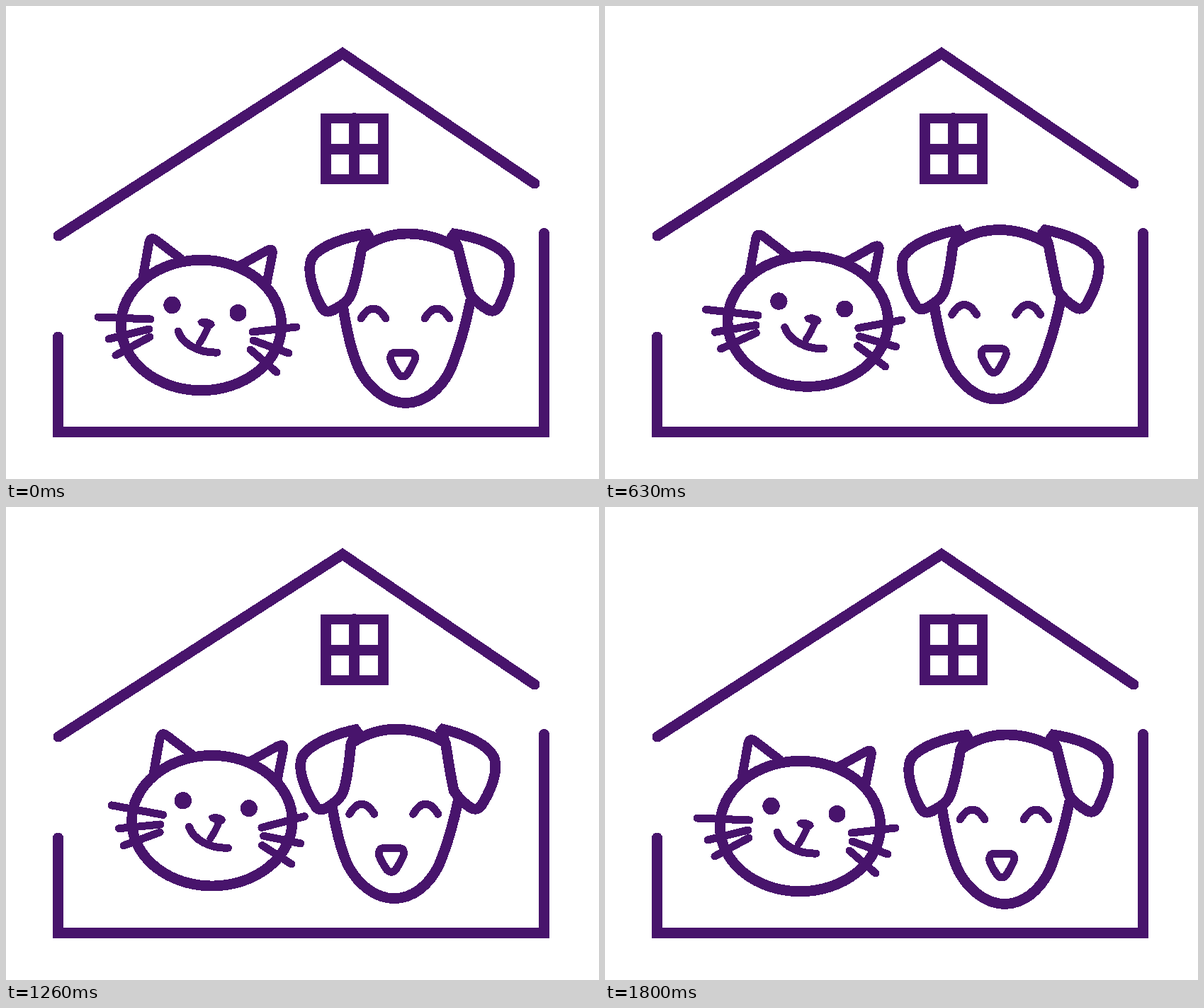
An HTML page for the animation above (2100 ms loop, 837 by 669 pixels).

```html
<!DOCTYPE html>
<html lang="en">
<head>
<meta charset="utf-8">
<title>Cat and dog at home</title>
<style>
  html, body { margin: 0; width: 100%; height: 100%; overflow: hidden; background: #fff; }
  svg { display: block; width: 837px; height: 669px; shape-rendering: crispEdges; }
  .line { fill: none; stroke: #48146c; stroke-width: 14.8; }
  .round { stroke-linecap: round; stroke-linejoin: round; }
  .solid { fill: #48146c; }
  .ear { fill: #fff; stroke-linejoin: bevel; }
  .wall { stroke-width: 15; stroke-linecap: round; }
  .thin { stroke-width: 11; }
</style>
</head>
<body>
<svg viewBox="0 0 837 669">
  <clipPath id="lids"><rect id="gap" x="220" width="30"/></clipPath>

  <path class="line wall" d="M74 325L475 67L746 251"/>
  <path class="line wall" d="M73.5 468V602.5H759.5V321.5"/>
  <path class="solid" fill-rule="evenodd" d="M444 152H540V252H444Z
    M459 166V195H484V166Z M499 166V195H525V166Z
    M459 210V238H484V210Z M499 210V238H525V210Z"/>
  <circle class="solid" cx="491.5" cy="158.5" r="7.5"/>

  <g id="cat">
    <ellipse class="line" cx="275.5" cy="451.5" rx="113.3" ry="92.3"/>
    <g class="line round" style="stroke-width:13">
      <path d="M193 384L202 334Q204 325 212 331L246 357"/>
      <path d="M330 367L368 346Q378 341 376 351L368 392"/>
    </g>
    <circle class="solid" cx="234.5" cy="423" r="12.2" clip-path="url(#lids)"/>
    <circle class="solid" cx="327.5" cy="434" r="12"/>
    <path class="solid" d="M270 446Q274 441 283 442Q294 444 295 451Q292 456 288 457L280 457Q279 453 273 452Z"/>
    <path class="line round" style="stroke-width:10" d="M285 454Q281 465 273 477"/>
    <path class="line round thin" d="M243 460C249 478 272 491 298 490"/>
    <path id="whiskL" class="line round thin" d="M204 443L130 440M202 457L145 471M203 468L155 494"/>
    <path id="whiskR" class="line round thin" d="M348 461L410 454M349 473L399 491M345 486L382 518"/>
  </g>

  <g id="dog">
    <path class="line" d="M505 341C525 328 545 322 567 322C592 322 614 329 634 340"/>
    <path class="line" d="M475 422C482 467 489 494 499 515C514 543 539 561.5 564 561.5C590 561.5 613 543 627 515C637 491 648 456 656 415"/>
    <path id="earL" class="line ear" d="M514 322C480 326 444 339 432 356C425 370 430 392 439 414L445 425Q450 436 462 430C479 421 486 414 489 402C495 385 499 360 502 342Z"/>
    <path id="earR" class="line ear" d="M628.5 321.5C668 327 700 340 708.5 358C715 375 708 400 698 420Q692 435 681 430Q666 422 655 408C648 385 643 362 638 342Z"/>
    <g class="line round thin">
      <path d="M501 442C506 434 511 428 518.5 428S531 434 536 442"/>
      <path d="M591 442C596 434 601 428 608.5 428S621 434 626 442"/>
      <path d="M551 490H569Q580 490 577 501Q571 514 566 521Q560 527 554 521Q546 510 543 501Q541 490 551 490Z"/>
    </g>
  </g>
</svg>
<script>
const LOOP = 2100, STEP = 30, START = 10, HALF = 25;
const $ = id => document.getElementById(id);
const move = (id, x, y) => $(id).setAttribute('transform', `translate(${x} ${y})`);
const turn = (id, deg, x, y) => $(id).setAttribute('transform', `rotate(${deg} ${x} ${y})`);

function draw(ms) {
  const step = Math.floor((ms % LOOP) / STEP) - START;
  const n = Math.max(0, Math.min(step, 2 * HALF - step));
  const p = n / HALF;
  const lean = Math.sin(p * Math.PI / 2);
  const swing = (1 - Math.cos(p * Math.PI)) / 2;

  move('cat', 17 * lean, -8.6 * lean);
  move('dog', -17.9 * lean, -8.6 * lean);
  turn('earL', -5.3 * p, 510, 325);
  turn('earR', 6.3 * p, 634, 325);
  turn('whiskL', 10 * swing, 204, 460);
  turn('whiskR', -10 * swing, 348, 478);

  // wink at the end of the lean
  const open = 25 - 6.3 * Math.max(0, n - 22);
  $('gap').setAttribute('y', 423 - open / 2);
  $('gap').setAttribute('height', open);
}

const t0 = performance.now();
function tick() {
  draw(performance.now() - t0);
  requestAnimationFrame(tick);
}
tick();
</script>
</body>
</html>
```
